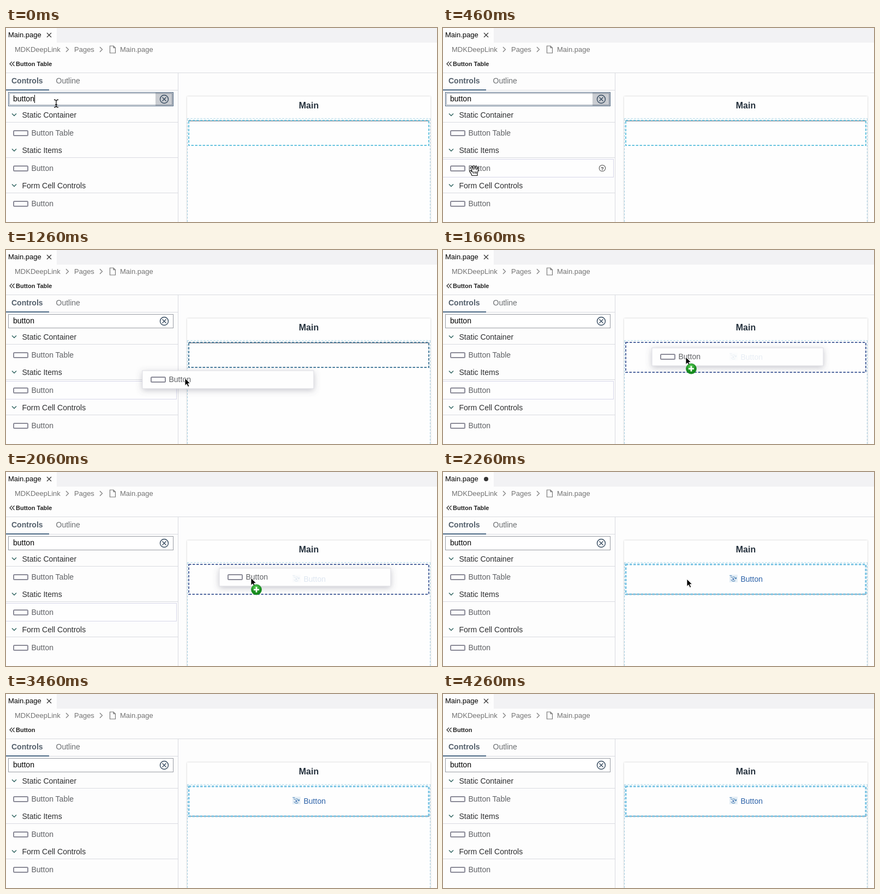
An HTML page for the animation above (4.46 s loop, 790x357 px).

```html
<!DOCTYPE html>
<html lang="en">
<head>
<meta charset="utf-8">
<style>
  html, body { margin: 0; width: 100%; height: 100%; overflow: hidden; background: #fdfdfd; }
  svg { display: block; width: 790px; height: 357px; font: 14px "Liberation Sans", Arial, sans-serif; }
  .line { fill: none; stroke: #d9dae0; }
  .icon { fill: none; stroke: #8b8b98; stroke-width: 2; }
  .crumb { font-size: 13px; fill: #737373; }
  .item { fill: #5f6165; }
  .navy { fill: none; stroke: #354a5f; stroke-width: 1.4; }
  .blue { fill: #2c62a8; }
  .bold { font-weight: bold; }
</style>
</head>
<body>
<svg viewBox="0 0 790 357">
  <defs>
    <filter id="cardShadow" x="-5%" y="-5%" width="110%" height="110%">
      <feDropShadow dx="0" dy="0" stdDeviation="1.8" flood-color="#000" flood-opacity=".2"/>
    </filter>
    <filter id="ghostShadow" x="-10%" y="-60%" width="120%" height="240%">
      <feDropShadow dx="0" dy="3" stdDeviation="6" flood-color="#555566" flood-opacity=".32"/>
    </filter>
    <radialGradient id="green" cx=".45" cy=".3">
      <stop offset="0" stop-color="#5fd35c"/><stop offset="1" stop-color="#168a1d"/>
    </radialGradient>
    <rect id="buttonIcon" class="icon" x="1" y="1" width="26" height="9" rx="1.5"/>
  </defs>

  <rect width="790" height="27" fill="#f2f2f4"/>
  <rect width="93" height="28" fill="#fdfdfd"/>
  <text x="4" y="17" font-size="13">Main.page</text>
  <path id="tabClose" d="M75 9l8 8M83 9l-8 8" stroke="#333" stroke-width="1.2"/>
  <circle id="tabDirty" cx="79" cy="13" r="4" fill="#333"/>

  <g class="crumb">
    <text x="16" y="44">MDKDeepLink</text>
    <text x="125" y="44">Pages</text>
    <text x="209" y="44">Main.page</text>
    <path d="M110 35l4.5 4.5-4.5 4.5M172 35l4.5 4.5-4.5 4.5M190.500 33h6.500l3.500 3.500v9.500h-10zM197 33v3.500h3.500"
      fill="none" stroke="#777" stroke-width="1.2"/>
  </g>
  <path d="M11 62l-4 4 4 4M15.500 62l-4 4 4 4" fill="none" stroke="#333" stroke-width="1.3"/>
  <text id="title" class="bold" x="18" y="70" font-size="11" fill="#222"></text>
  <path class="line" d="M0 82.500H790M315.500 83V357M0 114.500H315M0 173.500H315M0 238.500H315M0 303.500H315"/>

  <text class="bold" x="10" y="102" fill="#54606c">Controls</text>
  <text x="91.500" y="102" fill="#6a6d70">Outline</text>
  <rect y="113" width="79" height="2" fill="#4a6784"/>

  <rect x="4.500" y="118.500" width="302" height="25" fill="#fff" stroke="#989ca3"/>
  <g id="focus">
    <rect x="274" y="119" width="32" height="24" fill="#c9ccd1"/>
    <rect x="4.500" y="118.500" width="302" height="25" fill="none" stroke="#4d6580"/>
    <rect x="6.500" y="120.500" width="298" height="21" fill="none" stroke="#33475e" stroke-dasharray="1 1"/>
  </g>
  <text x="13" y="135">button</text>
  <path id="caret" d="M52.500 123v15" stroke="#000"/>
  <g class="navy">
    <circle cx="290" cy="131" r="7.500"/>
    <path d="M286.500 127.500l7 7m0-7l-7 7"/>
  </g>

  <g id="hoverRow">
    <rect x="-.5" y=".5" width="313" height="33" fill="#fefefe" stroke="#d6d6e8"/>
    <g id="help">
      <circle cx="292" cy="17" r="5.700" fill="none" stroke="#555" stroke-width="1.100"/>
      <text class="bold" x="292" y="20.500" font-size="9.500" text-anchor="middle" fill="#444">?</text>
    </g>
  </g>
  <g id="sections"></g>

  <rect x="332" y="126" width="446" height="260" fill="#fefefe" filter="url(#cardShadow)"/>
  <text class="bold" x="555" y="148" font-size="16" text-anchor="middle" fill="#26323e">Main</text>
  <path d="M332 166.500H778" stroke="#b5dcea" stroke-dasharray="4 2"/>
  <path d="M332.500 167V357M777.500 167V357" stroke="#a9cfe2" stroke-dasharray="4 2"/>
  <path id="bar" d="M334 0H776" stroke="#a6a7ae" stroke-width="2"/>
  <rect id="zone" x="335" y="170" width="440" fill="none" stroke-dasharray="4.500 2.500"/>

  <g id="tag">
    <rect x="336" y="171" width="38.500" height="15" fill="#4b70bd"/>
    <text x="337" y="182.500" font-size="12" fill="#fff">Button</text>
  </g>

  <g id="ghost">
    <rect width="314" height="33" fill="#fefefe" stroke="#dcdce2" filter="url(#ghostShadow)"/>
    <use href="#buttonIcon" x="15" y="11"/>
    <text class="item" x="48.500" y="21">Button</text>
  </g>

  <g id="preview">
    <rect x="525" y="189" width="15" height="14" fill="#e6eff6"/>
    <path d="M525.500 190.500h4M527 193h2M529 194.500a4.500 4.500 0 0 1 7.500 1.500M535.500 199.500a4.500 4.500 0 0 1-7.500-1.500M537.500 193.500v3h-3"
      fill="none" stroke="#5488b8" stroke-width="1.100"/>
    <circle cx="532" cy="197" r="1.500" class="blue"/>
    <text class="blue" x="545.500" y="201.500">Button</text>
  </g>

  <g id="cursor" stroke-linejoin="round">
    <path id="beam" d="M-4-7q4 0 4 3V4q0 3-4 3M4-7q-4 0-4 3V4q0 3 4 3M-2 2h4" fill="none" stroke="#111" stroke-width="1.300"/>
    <path id="arrow" d="M0 0v13.500l3.200-2.800 2.300 5 2.300-1-2.200-5h4.200z" fill="#000" stroke="#fff" stroke-width=".9"/>
    <path id="hand" d="M-4 9.500q-1-4-4-7c-1-2 1.500-3 3-1l1.500 1.500-2.500-8c0-2 2-2.500 3-.5l1.500 4-.5-6c0-2 2.500-2 3 0l.5 5.500 1.200-5c.5-2 2.800-1.500 2.600.5l-.5 5.500 1.500-3c1-1.500 2.700-.5 2.300 1l-2.600 8v4.500zM-1.500 2v4M1.500 2v4M4 2v4"
      fill="#fff" stroke="#111" stroke-width="1.200"/>
    <path id="move" d="M0-8l3.500 4h-2v2.500h2.500v-2L8 0l-4 3.500v-2h-2.500v2.500h2L0 8l-3.500-4h2v-2.500h-2.500v2L-8 0l4-3.500v2h2.500v-2.500h-2z"
      fill="#000" stroke="#fff" stroke-width=".8"/>
    <g id="plus">
      <circle cx="10" cy="21.500" r="9.500" fill="url(#green)" stroke="#138a1d" stroke-width=".7"/>
      <path d="M10 16.500v10M5 21.500h10" stroke="#fff" stroke-width="2.600"/>
    </g>
  </g>
</svg>
<script>
const DURATION = 4460;
const el = id => document.getElementById(id);
const show = (id, on) => el(id).style.display = on ? "" : "none";
const place = (id, [x, y]) => el(id).setAttribute("transform", `translate(${x} ${y})`);
const setAttrs = (id, attrs) => {
  for (const name in attrs) el(id).setAttribute(name, attrs[name]);
};

el("sections").innerHTML = [
  ["Static Container", "Button Table"],
  ["Static Items", "Button"],
  ["Form Cell Controls", "Button"],
].map(([heading, item], i) => `<g transform="translate(0 ${i * 65})">
  <path d="M11 157.500l4 4 4-4" fill="none" stroke="#2d625f" stroke-width="1.400"/>
  <text x="29.500" y="164.500" fill="#2c2d2f">${heading}</text>
  <use href="#buttonIcon" x="13" y="188"/>
  <text class="item" x="46.500" y="197.500">${item}</text>
</g>`).join("");

// Pointer: start time, shape, position
const pointerSteps = [
  [0, "beam", [92, 139]],
  [60, "arrow", [74, 231]],
  [260, "hand", [62, 258]],
  [460, "hand", [57, 262]],
  [1060, "arrow", [226, 247]],
  [1260, "arrow", [328, 236]],
  [1460, "arrow", [402, 212]],
  [1660, "arrow", [445, 197]],
  [1860, "arrow", [447, 196]],
  [2060, "arrow", [449, 195]],
  [2260, "arrow", [447, 197]],
  [2460, "move", [447, 199]],
  [3060, "hand", [200, 325]],
  [3260, "none", [0, 0]],
];
const ghostSteps = [
  [1060, [158, 229]], [1260, [250, 222]], [1460, [339, 199]],
  [1660, [383, 180]], [1860, [391, 177]],
];
const latest = (steps, t) => steps.findLast(step => step[0] <= t);

function render(t) {
  const between = (from, to) => t >= from && t < to;
  const dragging = between(1060, 2260);
  const accepting = between(1660, 2260);
  const dropped = t >= 2260;
  const dirty = between(2260, 3260);
  const lowerHover = between(3060, 3260);

  show("tabClose", !dirty);
  show("tabDirty", dirty);
  el("title").textContent = t < 2460 ? "Button Table" : "Button";
  show("focus", t < 860);
  show("caret", t < 460);

  show("hoverRow", between(260, 2260) || lowerHover);
  place("hoverRow", [0, lowerHover ? 306 : 241]);
  show("help", between(260, 1060) || lowerHover);

  setAttrs("zone", {
    height: t < 1660 ? 46 : 55,
    stroke: accepting ? "#5269a0" : dragging ? "#4c7f9e" : dropped ? "#79c3e3" : "#69c4df",
    "stroke-width": dropped ? 3 : 2,
  });
  show("bar", !accepting);
  place("bar", [0, dropped ? 225 : 171]);
  show("tag", between(2460, 3060));

  show("ghost", dragging);
  if (dragging) place("ghost", latest(ghostSteps, t)[1]);
  show("preview", t >= 1660);
  el("preview").style.opacity = dropped ? 1 : t < 1860 ? .1 : .15;

  const [, shape, position] = latest(pointerSteps, t);
  for (const id of ["beam", "arrow", "hand", "move"]) show(id, id === shape);
  show("plus", accepting);
  place("cursor", position);
}

function frame() {
  render(performance.now() % DURATION);
  requestAnimationFrame(frame);
}
frame();
</script>
</body>
</html>
```
